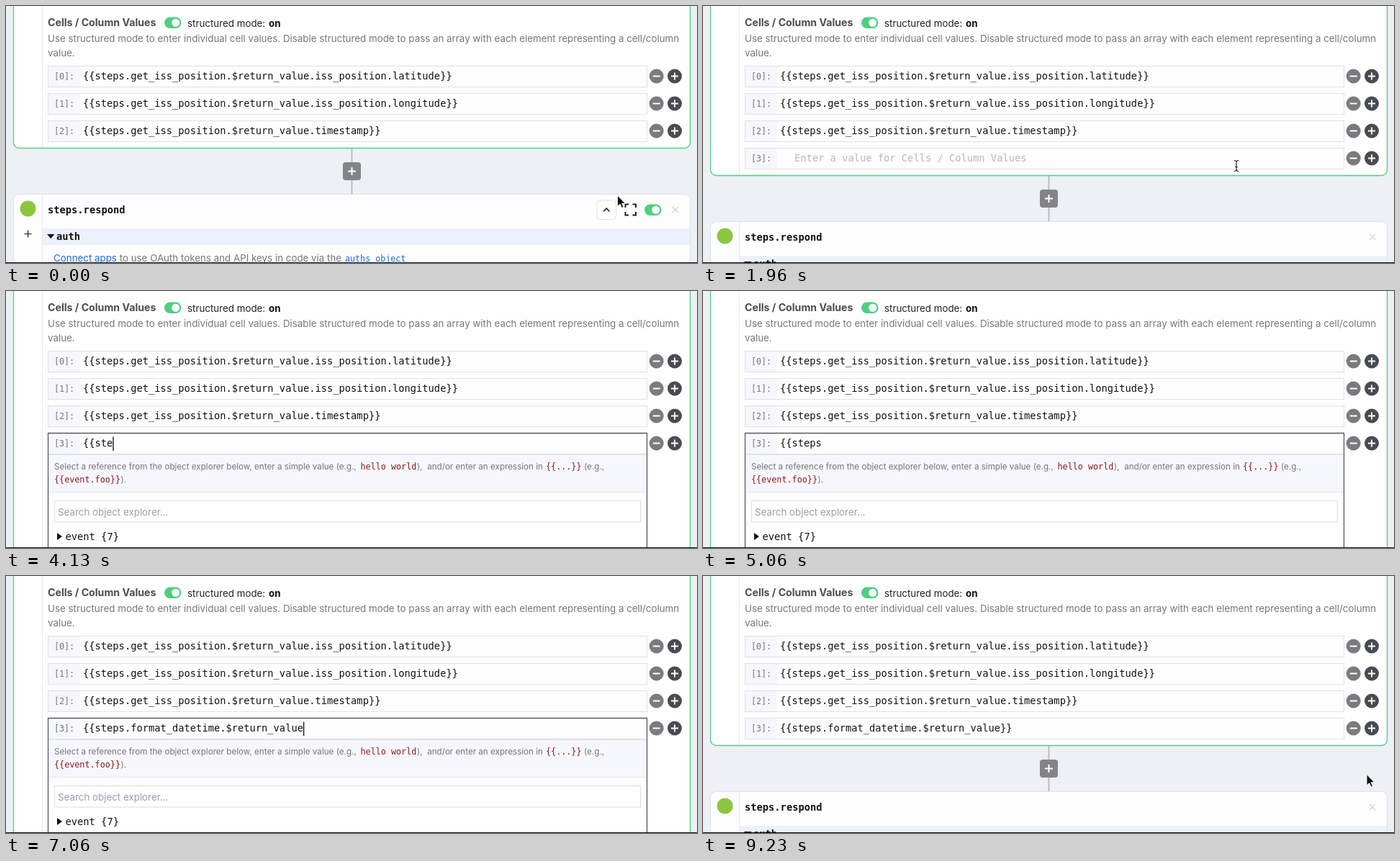
Animation of 960x357 px, one loop 10000 ms. Source, as an HTML page:

```html
<!DOCTYPE html>
<html lang="en">
<head>
<meta charset="utf-8">
<title>Structured mode form</title>
<style>
html, body { margin: 0; width: 100%; height: 100%; overflow: hidden; background: #edf0f4; }
svg { display: block; width: 960px; height: 357px; }
text { font: 13.35px Inter, Roboto, sans-serif; fill: #777; white-space: pre; }
.mono { font: 13.74px "DejaVu Sans Mono", "Liberation Mono", monospace; fill: #111; }
.bold { font-weight: 700; }
.small { font-size: 11.7px; }
.help text { font-size: 11.65px; }
.help .mono { font-size: 11.75px; fill: #8f1818; }
.link { fill: #1a6bdc; text-decoration: underline; }
</style>
</head>
<body>
<svg id="stage" viewBox="0 0 960 357" xmlns="http://www.w3.org/2000/svg"></svg>
<script>
const LOOP = 10000;
const VALUE = "{{steps.format_datetime.$return_value}}";
const CHAR = 8.27, TEXT_X = 107, ROW_STEP = 38;
const ADD_ROW = 1360, OPEN = 2200, HIDE_POINTER = 3200, SHOW_POINTER = 8230, CLOSE = 9230;

// [time, characters typed, caret visible]
const typing = [
  [2200, 0, 1], [2660, 0, 0], [3130, 0, 1], [3200, 1, 1], [3330, 2, 1], [3860, 2, 0],
  [3900, 3, 1], [4130, 5, 1], [4260, 6, 1], [4560, 7, 1], [5060, 7, 0],
  [5200, 8, 1], [5660, 8, 0], [5830, 23, 1], [6330, 23, 0], [6400, 24, 1],
  [6860, 24, 0], [7060, 37, 1], [7560, 37, 0], [7800, 38, 1], [7930, 39, 1],
  [8430, 39, 0], [8930, 39, 1]
];

// [start, end, from, to] of each pointer move
const moves = [
  [230, 860, [849.5, 263], [933, 180]],
  [1360, 1960, [933, 180], [741, 222]],
  [8200, 9030, [741, 222], [922, 275.5]]
];

const rect = (x, y, w, h, fill, extra = "") =>
  `<rect x="${x}" y="${y}" width="${w}" height="${h}" fill="${fill}" ${extra}/>`;
const label = (x, y, text, cls = "", extra = "") =>
  `<text x="${x}" y="${y}" class="${cls}" ${extra}>${text}</text>`;
const line = (d, color, width, extra = "") =>
  `<path d="${d}" fill="none" stroke="${color}" stroke-width="${width}" ${extra}/>`;
const group = (id, body, extra = "") => `<g id="${id}" ${extra}>${body}</g>`;

const toggle = (x, y) =>
  rect(x, y, 23.5, 15.5, "#4fcf80", 'rx="7.75"') +
  `<circle cx="${x + 15.7}" cy="${y + 7.75}" r="5.5" fill="#fff"/>`;

function roundButton(x, y, color, plus, id = "") {
  const d = `M${x - 5} ${y}h10` + (plus ? `M${x} ${y - 5}v10` : "");
  return `<circle ${id && `id="${id}"`} cx="${x}" cy="${y}" r="10" fill="${color}"/>` + line(d, "#fff", 2);
}

function row(index, text) {
  const y = 83.5 + ROW_STEP * index, mid = y + 14;
  return rect(58.5, y, 832, 29, "#fdfdfd", 'stroke="#e0e0e8"') +
    rect(59, y + .5, 44, 28, "#f6f6fd") +
    label(67, mid + 4.5, `[${index}]:`, "mono small", 'style="fill:#777"') +
    label(TEXT_X, mid + 4.5, text, "mono", `id="value${index}"`) +
    roundButton(903.7, mid, "#7b7b7d", false) +
    roundButton(929, mid, "#484b52", true, `add${index}`);
}

const header =
  label(58, 28, "Cells / Column Values", "bold", 'style="font-size:14.15px;fill:#4e4e4e"') +
  toggle(220, 15.5) +
  label(252, 28.5, "structured mode:", "", 'style="fill:#222"') +
  label(365, 28.5, "on", "bold", 'style="fill:#111"') +
  label(58, 49.5, "Use structured mode to enter individual cell values. Disable structured mode to pass an array with each element representing a cell/column") +
  label(58, 70, "value.");

const explorer =
  rect(59, 227, 831, 52, "#f6f6fd") +
  line("M59 227.5H890M59 279.5H890", "#e3e3ec", 1) +
  group("help",
    label(67, 248, "Select a reference from the object explorer below, enter a simple value (e.g.,") +
    label(492.5, 248, "hello world", "mono") +
    label(571, 248, "),  and/or enter an expression in") +
    label(750, 248, "{{...}}", "mono") +
    label(803, 248, "(e.g.,") +
    label(67, 265.5, "{{event.foo}}", "mono") +
    label(159.5, 265.5, ")."), 'class="help"') +
  rect(67.5, 291.5, 814, 29.5, "#fefefe", 'stroke="#dcdce6"') +
  label(72, 311.5, "Search object explorer...", "", 'style="fill:#9a9fb2"') +
  '<path d="M71 336l7 5l-7 5z" fill="#111"/>' +
  label(82.5, 345.5, "event {7}", "mono") +
  line("M58.5 360V197.5H890.5V360", "#55585e", 1.3);

const hoverTools =
  line("M25.5 316.5h10M30.5 311.5v10", "#444", 1.6) +
  rect(821, 270, 26.5, 26.5, "#fefefe", 'rx="4" stroke="#dedee2"') +
  line("M830 285.5l4.2-4.5l4.2 4.5", "#222", 1.6) +
  line("M860.5 280v-4.5h4.5M870.5 275.5h4.5v4.5M875 286v4.5h-4.5M865 290.5h-4.5v-4.5", "#222", 2) +
  toggle(887, 275.5);

const nextStep =
  line("M480.5 198V262", "#b9bcc1", 2) +
  rect(468, 217, 25, 25, "#848487", 'rx="4"') +
  line("M475 229.5h11M480.5 224v11", "#fff", 2) +
  rect(10.5, 261.5, 940, 130, "#fdfdfd", 'rx="8" stroke="#dfe2e7"') +
  line("M50.5 262V390", "#e6e8ec", 1) +
  '<circle cx="30.5" cy="281.5" r="11" fill="#8cc63f"/>' +
  label(58, 288, "steps.respond", "mono bold") +
  line("M926 279l8 8m0-8l-8 8", "#d3d5d8", 1.4) +
  rect(51, 309, 899, 23, "#ebf1fd") +
  '<path d="M57 317h10.5l-5.25 6z" fill="#111"/>' +
  label(70, 325, "auth", "mono bold") +
  label(66, 355, '<tspan class="link">Connect apps</tspan> to use OAuth tokens and API keys in code via the') +
  label(471, 355, "auths object", "mono small link", 'style="fill:#1a6bdc"') +
  group("tools", hoverTools);

const handShape = "M-1.5 1C-1.5-.7 1-.7 1.2 1L2 5.5C3 4.7 4.2 5 4.5 6C5.5 5.3 6.6 5.8 6.8 6.8" +
  "C8 6.4 8.8 7.2 8.8 8.4C8.8 11 8.6 12.5 7.6 15H.8C-.5 12.5-2.6 11-4 9C-4.2 7.4-2.3 7.2-.5 8.8Z";
const beamShape = "M-3-7.5Q0-7.5 0-5Q0-7.5 3-7.5M0-5V5M-3 7.5Q0 7.5 0 5Q0 7.5 3 7.5M-2 1.5H2";

const pointers =
  group("arrow", '<path d="M0 0V15.5L3.6 12.2L6 17.5L8.5 16.4L6.2 11.3H11Z" fill="#111" stroke="#fff"/>') +
  group("hand", `<path d="${handShape}" fill="#fff" stroke="#111" stroke-linejoin="round"/>`) +
  group("ibeam", line(beamShape, "#fff", 3) + line(beamShape, "#222", 1.2));

const stage = document.getElementById("stage");
const prefix = "{{steps.get_iss_position.$return_value.";
stage.innerHTML =
  rect(0, 0, 960, 357, "#edf0f4") +
  group("next", nextStep) +
  rect(10.5, -20, 940, 217.5, "#fdfefd", 'id="card" rx="8" stroke="#4fcf80" stroke-width="1.3"') +
  line("M50.5 0V197", "#e6e8ec", 1, 'id="divider"') +
  header +
  row(0, prefix + "iss_position.latitude}}") +
  row(1, prefix + "iss_position.longitude}}") +
  row(2, prefix + "timestamp}}") +
  group("newRow", row(3, "") +
    label(127, 216, "Enter a value for Cells / Column Values", "mono", 'id="placeholder" style="fill:#b3b8c4"')) +
  group("explorer", explorer) +
  rect(0, 202.5, 1.3, 19.5, "#111", 'id="caret"') +
  pointers +
  rect(0, 356, 960, 1, "#111");

const $ = id => document.getElementById(id);
const show = (id, on) => { $(id).style.display = on ? "" : "none"; };
const ease = p => p * p * (3 - 2 * p);

function pointerAt(t) {
  let spot = moves[0][2];
  for (const [start, end, from, to] of moves) {
    if (t < start) break;
    const p = ease(Math.min(1, (t - start) / (end - start)));
    spot = from.map((v, i) => v + (to[i] - v) * p);
  }
  return spot;
}

function drawPointer(t, hasRow) {
  const [x, y] = pointerAt(t);
  const onAdd = Math.hypot(x - 929, y - 173.5) < 11;
  const onField = hasRow && x > 103 && x < 890 && y > 197 && y < 227;
  const kind = onAdd ? "hand" : onField ? "ibeam" : "arrow";
  const visible = t < HIDE_POINTER || t >= SHOW_POINTER;
  for (const id of ["arrow", "hand", "ibeam"]) {
    show(id, visible && id === kind);
    $(id).setAttribute("transform", `translate(${x.toFixed(2)} ${y.toFixed(2)})`);
  }
  $("add2").setAttribute("fill", onAdd ? "#141416" : "#484b52");
}

function render(t) {
  const hasRow = t >= ADD_ROW, open = t >= OPEN && t < CLOSE;
  const bottom = open ? 400 : hasRow ? 197.5 + ROW_STEP : 197.5;
  $("card").setAttribute("height", bottom + 20);
  $("divider").setAttribute("d", `M50.5 0V${bottom - .5}`);
  $("next").setAttribute("transform", `translate(0 ${hasRow ? ROW_STEP : 0})`);
  show("next", !open);
  show("tools", t < 30);
  show("newRow", hasRow);
  show("explorer", open);

  let count = 0, caret = 0;
  for (const [at, n, on] of typing) if (t >= at) [count, caret] = [n, on];
  $("value3").textContent = VALUE.slice(0, count);
  show("placeholder", !count);
  $("caret").setAttribute("x", TEXT_X + CHAR * count);
  show("caret", open && caret);
  drawPointer(t, hasRow);
}

const began = performance.now();
function tick() {
  render((performance.now() - began) % LOOP);
  requestAnimationFrame(tick);
}
render(0);
requestAnimationFrame(tick);
</script>
</body>
</html>
```
